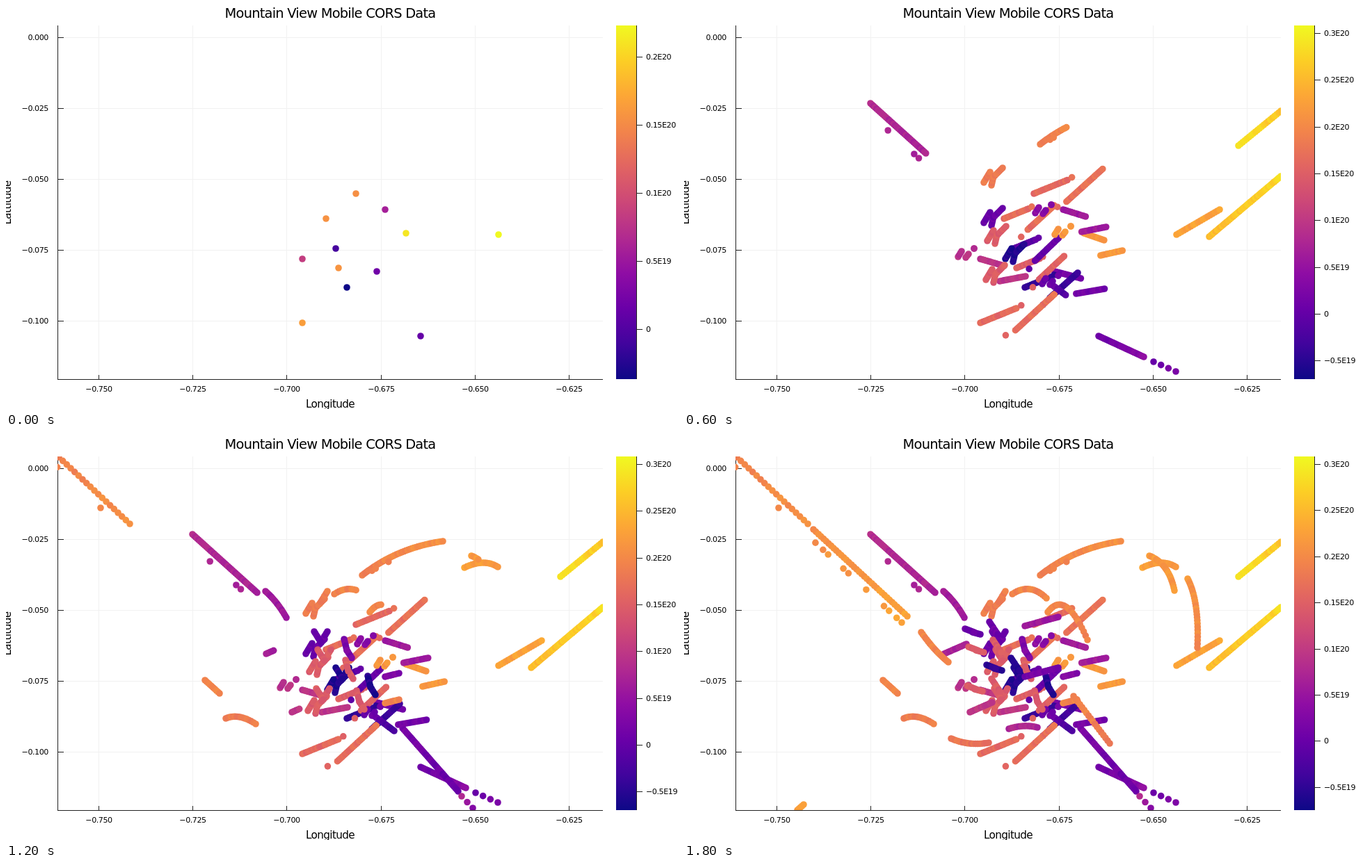
Write an HTML page with a canvas that moves like this. It is 966 px wide and 580 px high and loops after 1.85 s.

```html
<!DOCTYPE html>
<html lang="en">
<head>
<meta charset="utf-8">
<title>Mobile CORS scatter</title>
<style>
html, body { margin: 0; width: 100%; height: 100%; overflow: hidden; background: #fff; }
canvas { display: block; }
</style>
</head>
<body>
<canvas id="c" width="966" height="580"></canvas>
<script>
const ctx = document.getElementById('c').getContext('2d');
const LOOP = 1850, STEP = 50;
const L = 74, T = 28, R = 858, B = 537;
const FONT = '"DejaVu Sans", Verdana, sans-serif';
const PLASMA = ['0d0887', '41049d', '6a00a8', '8f0da4', 'b12a90', 'cc4778',
  'e16462', 'f2844b', 'fca636', 'fcce25', 'f0f921']
  .map(h => [0, 2, 4].map(i => parseInt(h.slice(i, i + 2), 16)));

function plasma(f) {
  f = Math.min(1, Math.max(0, f)) * 10;
  const i = Math.min(9, Math.floor(f)), u = f - i;
  return 'rgb(' + PLASMA[i].map((a, j) => Math.round(a + (PLASMA[i + 1][j] - a) * u)) + ')';
}

let seed = 11;
const rnd = () => (seed = seed * 16807 % 2147483647) / 2147483647;

// Each dot: position, value in 1e19, step at which it appears
const dots = [];
function put(level, x, y, k) {
  dots.push({ x, y, k, v: -0.69 + 0.0377 * (level + (rnd() - 0.5) * 6) });
}

// Row of dots laid between steps k0 and k1, straight or curved through a middle point
function trace(k0, k1, lv0, lv1, pts, gap = 3, stray = 0) {
  const [x0, y0] = pts, [x2, y2] = pts.slice(-2);
  const [x1, y1] = pts.length > 4 ? pts.slice(2) : [(x0 + x2) / 2, (y0 + y2) / 2];
  const n = Math.max(1, Math.round(Math.hypot(x2 - x0, y2 - y0) / gap));
  for (let i = 0; i <= n; i++) {
    const u = i / n, a = (1 - u) * (1 - 2 * u), b = 4 * u * (1 - u), c = u * (2 * u - 1);
    const x = a * x0 + b * x1 + c * x2, y = a * y0 + b * y1 + c * y2;
    const lv = lv0 + (lv1 - lv0) * u, k = k0 + (k1 - k0) * u;
    put(lv, x, y, k);
    if (rnd() < stray) put(lv, x - 8, y + 9, k);
  }
}

// The same stroke repeated at every anchor: [level, x, y]
function stroke(anchors, k0, k1, x0, y0, x1, y1) {
  for (const [lv, x, y] of anchors) trace(k0, k1, lv, lv, [x + x0, y + y0, x + x1, y + y1]);
}

// Rising satellites: a short sweep, a stray reading, then a steeper sweep
for (const [lv, x, y, s] of [
  [62, 503, 270, 1.3], [62, 460, 306, 0.95], [17, 474, 349, 0.85],
  [58, 478, 377, 0.9], [7, 490, 405, 1], [61, 426, 456, 1.4]
]) {
  trace(0, 3.4, lv, lv, [x, y, x + 37 * s, y - 15 * s]);
  put(lv, x + 42 * s, y - 18 * s, 4);
  put(lv, x + 26 * s, y + 25 / s, 4);
  trace(4, 8, lv, lv + 3, [x + 36 * s, y + 15 / s, x + 76 * s, y - 21 * s * s]);
}

// Falling satellites
for (const [lv, x, y, s] of [
  [34, 545, 293, 0.95], [76, 575, 327, 0.85], [43, 426, 364, 1], [22, 533, 382, 1.1]
]) {
  trace(0, 3.4, lv, lv, [x, y, x + 34 * s, y + 10]);
  trace(4, 8, lv, lv, [x + 28 * s, y + 32, x + 65 * s, y + 25]);
}

const forks = [[67, 431, 254], [20, 431, 312], [57, 436, 338], [4, 462, 364], [57, 434, 394]];
stroke(forks, 8.1, 9.5, 0, 0, 9, -15);
stroke(forks, 9, 10.5, 11, 4, 14, -9);
stroke(forks, 10.5, 12, 14, -8, 27, -21);
stroke(forks, 13, 18, 20, -14, 31, -32);
const inner = forks.slice(1);
stroke(inner, 20, 24, 12, -32, 22, -16);
stroke(inner, 24.5, 27, -16, -31, -5, -28);
stroke(inner, 26, 29, 8, -46, 20, -28);
stroke(inner, 30, 36, -27, -36, -14, -31);

const hooks = [[42, 394, 361], [28, 505, 298], [75, 533, 329], [20, 515, 400]];
stroke(hooks, 8.1, 9.5, 0, 0, 5, -8);
stroke(hooks, 9.5, 11, 11, 1, 15, -4);
stroke(hooks, 12, 12, 23, -12, 23, -12);

const tails = [[24, 497, 318], [58, 499, 348], [4, 531, 371], [57, 515, 392]];
stroke(tails, 14, 18, -7, -11, 0, 0);
stroke(tails, 20, 24, -11, -27, -7, -11);

stroke([[25, 545, 345], [70, 545, 383]], 17, 24, 0, 0, 20, -5);
stroke([[36, 374, 312], [44, 411, 396]], 21, 29, 0, 0, 32, -14);
stroke([[33, 490, 272], [22, 490, 345]], 26, 36, 0, 0, 48, -13);

// Eastern tracks
trace(0, 4, 77, 80, [708, 329, 770, 293], 4);
trace(4, 8.6, 85, 92, [755, 332, 858, 245]);
trace(8.1, 12, 94, 88, [797, 201, 858, 151], 4);
trace(17, 23.5, 78, 75, [659, 188, 685, 181, 707, 187]);
trace(22.2, 30, 76, 75, [669, 171, 692, 189, 705, 221]);
trace(25, 36, 75, 70, [724, 204, 736, 245, 738, 303], 4);

// Southern tracks
trace(0, 3.4, 20, 28, [596, 475, 661, 505]);
trace(3.2, 5, 22, 26, [675, 512, 707, 526], 11);
trace(10, 13, 20, 10, [530, 402, 558, 423]);
trace(12.1, 18, 24, 18, [570, 419, 650, 510]);
trace(18, 19, 40, 24, [655, 517, 671, 534], 10);
trace(24.2, 35, 70, 67, [560, 373, 612, 441], 5);
trace(30, 36, 38, 38, [467, 420, 488, 416, 508, 418]);

// Arches over the centre
trace(8.1, 19, 68, 74, [512, 199, 566, 167, 628, 150], 3, 0.06);
trace(16, 28, 70, 69, [472, 226, 497, 219, 521, 232]);
trace(18, 36, 71, 69, [523, 252, 550, 245, 580, 292]);

// Western tracks
trace(7.9, 12.6, 40, 37, [268, 140, 361, 224], 3, 0.1);
trace(14, 19, 34, 34, [373, 222, 389, 239, 403, 260]);
trace(12.1, 15, 69, 69, [286, 350, 307, 369]);
trace(17, 24, 67, 67, [316, 405, 336, 403, 359, 413]);
trace(28, 36, 66, 62, [384, 434, 410, 441, 438, 440]);
trace(22.2, 24, 69, 74, [76, 29, 178, 125], 8, 0.12);
trace(24.2, 29, 72, 78, [186, 133, 321, 258], 5, 0.15);
trace(30, 36, 70, 69, [341, 281, 360, 305, 380, 324]);
trace(32, 34, 78, 78, [163, 537, 172, 529]);

dots.sort((a, b) => a.k - b.k);

// Colour limits over the run: step, low, high
const LIMITS = [[0, -.367, 2.23], [7, -.68, 2.966], [11, -.698, 3.08],
  [30, -.698, 3.08], [32, -.75, 3.083], [40, -.75, 3.083]];
function limits(k) {
  const i = LIMITS.findIndex(s => s[0] > k), a = LIMITS[i - 1], b = LIMITS[i];
  const u = (k - a[0]) / (b[0] - a[0]);
  return [a[1] + (b[1] - a[1]) * u, a[2] + (b[2] - a[2]) * u];
}

function line(x0, y0, x1, y1, color) {
  ctx.strokeStyle = color;
  ctx.lineWidth = 1;
  ctx.beginPath();
  ctx.moveTo(x0, y0);
  ctx.lineTo(x1, y1);
  ctx.stroke();
}

function text(s, x, y, size, align) {
  ctx.font = size + 'px ' + FONT;
  ctx.letterSpacing = -0.039 * size + 'px';
  ctx.textAlign = align;
  ctx.fillStyle = '#000';
  ctx.fillText(s, x, y);
}

const TITLE = 19.4, LABEL = 15.2, TICK = 11.1;
const signed = (n, s) => (n < 0 ? '\u2212' : '') + s;

function axes() {
  const ink = '#222', grid = '#f1f1f1';
  const xs = [], ys = [];
  for (let i = 0; i < 6; i++) xs.push(Math.round(133 + i * 135.2) + 0.5);
  for (let i = 0; i < 5; i++) ys.push(45.5 + i * 102);
  xs.forEach(x => line(x, T, x, B, grid));
  ys.forEach(y => line(L, y, R, y, grid));
  line(L, B + 0.5, R, B + 0.5, ink);
  line(L + 0.5, T, L + 0.5, B + 1, ink);
  xs.forEach((x, i) => {
    line(x, B - 6, x, B, ink);
    text('\u2212' + (0.75 - i * 0.025).toFixed(3), x, 555, TICK, 'center');
  });
  ys.forEach((y, i) => {
    line(L, y, L + 9, y, ink);
    text(signed(-i, (i * 0.025).toFixed(3)), 61, y + 3.5, TICK, 'right');
  });
  text('Mountain View Mobile CORS Data', 466, 17, TITLE, 'center');
  text('Longitude', 466, 578, LABEL, 'center');
  ctx.save();
  ctx.translate(7, 283);
  ctx.rotate(-Math.PI / 2);
  text('Lattitude', 0, 0, LABEL, 'center');
  ctx.restore();
}

const ramp = ctx.createLinearGradient(0, B, 0, T);
for (let i = 0; i <= 10; i++) ramp.addColorStop(i / 10, plasma(i / 10));

function bar(lo, hi) {
  ctx.fillStyle = ramp;
  ctx.fillRect(877, T, 30, B - T);
  line(906.5, T, 906.5, B, '#222');
  for (let n = Math.ceil(lo * 2); n <= hi * 2; n++) {
    const y = Math.round(B - (n / 2 - lo) / (hi - lo) * (B - T)) + 0.5;
    const s = n === 0 ? '0' : Math.abs(n) < 2 ? '0.5E19' : n / 20 + 'E20';
    line(907, y, 915, y, '#222');
    text(signed(n, s), 920, y + 3.5, TICK, 'left');
  }
}

function draw(k) {
  const [lo, hi] = limits(k);
  ctx.fillStyle = '#fff';
  ctx.fillRect(0, 0, 966, 580);
  axes();
  bar(lo, hi);
  ctx.save();
  ctx.beginPath();
  ctx.rect(L, T, R - L, B - T);
  ctx.clip();
  for (const d of dots) {
    if (d.k > k) break;
    ctx.fillStyle = plasma((d.v - lo) / (hi - lo));
    ctx.beginPath();
    ctx.arc(d.x, d.y, 4.8, 0, Math.PI * 2);
    ctx.fill();
  }
  ctx.restore();
}

const start = performance.now();
function tick() {
  draw(Math.floor((performance.now() - start) % LOOP / STEP));
  requestAnimationFrame(tick);
}
tick();
</script>
</body>
</html>
```
